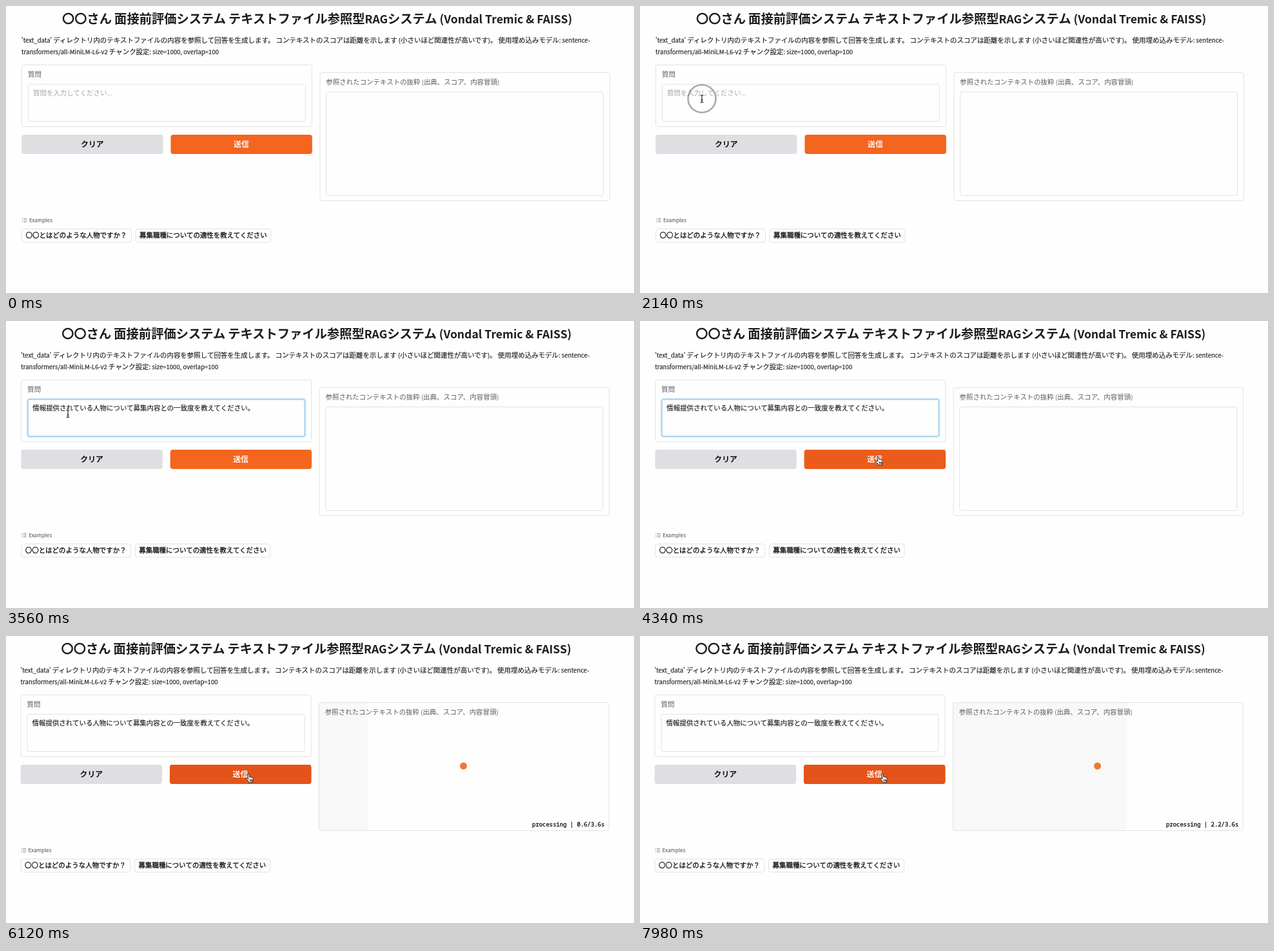
Write an HTML page that moves like this. It is 974 px wide and 446 px high and loops after 8 s.

```html
<!DOCTYPE html>
<html lang="ja">
<head>
<meta charset="utf-8">
<style>
  html, body { margin: 0; width: 100%; height: 100%; overflow: hidden; background: #fefefe; }
  svg { display: block; width: 974px; height: 446px; }
  text { font: 10.47px "Noto Sans CJK JP", "Noto Sans CJK", sans-serif; fill: #1c1c20; white-space: pre; }
  .latin { font-size: .91em; }
  .body { stroke: #1c1c20; stroke-width: .15; }
  .title { font-size: 19.3px; font-weight: 600; }
  .label { fill: #5c5c64; }
  .hint { fill: #a6a6ac; }
  .small { font-size: 8.9px; fill: #4a4a50; }
  .button { font-size: 11.9px; font-weight: 600; text-anchor: middle; fill: #111; }
  .chip { fill: #111; stroke: #111; stroke-width: .3; }
  #status { font: 8.92px "Noto Sans Mono", monospace; text-anchor: end; fill: #111; stroke: #111; stroke-width: .3; }
  .box { fill: none; stroke: #e2e2e6; }
  .cursor { stroke-linejoin: round; stroke-linecap: round; }
</style>
</head>
<body>
<svg viewBox="0 0 974 446">
  <g id="page">
    <text class="title" x="87" y="27">〇〇さん 面接前評価システム テキストファイル参照型RAGシステム (Vondal Tremic &amp; FAISS)</text>
    <text class="body" x="24" y="57.3">'text_data' ディレクトリ内のテキストファイルの内容を参照して回答を生成します。 コンテキストのスコアは距離を示します (小さいほど関連性が高いです)。 使用埋め込みモデル: sentence-</text>
    <text class="body" x="24" y="75">transformers/all-MiniLM-L6-v2 チャンク設定: size=1000, overlap=100</text>

    <rect class="box" x="24.5" y="91.5" width="450" height="96" rx="3"/>
    <text class="label" x="34" y="109.7">質問</text>
    <rect class="box" x="34.5" y="121.5" width="430" height="58" rx="3"/>
    <g id="focus" fill="none">
      <rect x="34.5" y="121.5" width="430" height="58" rx="3" stroke="#d8edfa" stroke-width="4"/>
      <rect x="34.5" y="121.5" width="430" height="58" rx="3" stroke="#8cc5ec"/>
    </g>
    <text id="hint" class="hint" x="42" y="139">質問を入力してください...</text>
    <text id="question" class="body" x="42" y="139">情報提供されている人物について募集内容との一致度を教えてください。</text>

    <rect x="24.2" y="200" width="219.4" height="30" rx="4" fill="#dfdfe3"/>
    <text class="button" x="133.9" y="219.3">クリア</text>
    <rect x="255.5" y="200" width="219.4" height="30" rx="4" fill="#f4651f"/>
    <rect id="hover" x="255.5" y="200" width="219.4" height="30" rx="4" fill="#e4531a"/>
    <text class="button" x="364.9" y="219.3" style="fill:#fff">送信</text>

    <rect id="bar" x="487" y="103.5" height="199" fill="#f8f8f8"/>
    <rect class="box" x="487" y="103.5" width="449.5" height="199" rx="3"/>
    <text class="label" x="496.3" y="121.7">参照されたコンテキストの抜粋 (出典、スコア、内容冒頭)</text>
    <rect id="output" class="box" x="496.5" y="133.5" width="430" height="161" rx="3"/>
    <g id="pending">
      <circle cx="711" cy="202" r="5.5" fill="#ee7a32"/>
      <text id="status" x="929.8" y="295.5"></text>
    </g>

    <path d="M25 330.5h1.2m1.3 0h5M25 333h1.2m1.3 0h5M25 335.5h1.2m1.3 0h5" stroke="#77777d" stroke-width=".8"/>
    <text class="small" x="36" y="336.2">Examples</text>
    <rect class="box" x="24.5" y="346.5" width="170" height="20.5" rx="4"/>
    <text class="chip" x="30.5" y="360.2">〇〇とはどのような人物ですか？</text>
    <rect class="box" x="201" y="346.5" width="210" height="20.5" rx="4"/>
    <text class="chip" x="207" y="360.2">募集職種についての適性を教えてください</text>
  </g>

  <g id="pointer" class="cursor">
    <g id="ring" fill="none">
      <circle r="21.5" stroke="#fff" stroke-width="5"/>
      <circle r="21.5" stroke="#111" stroke-width="2.6"/>
    </g>
    <g id="beam" fill="none">
      <path d="M-2-5.5Q0-5.5 0-4Q0-5.5 2-5.5M0-4V4.5M-2 6Q0 6 0 4.5Q0 6 2 6M-1.2 2H1.2" stroke="#fff" stroke-width="2.6"/>
      <path d="M-2-5.5Q0-5.5 0-4Q0-5.5 2-5.5M0-4V4.5M-2 6Q0 6 0 4.5Q0 6 2 6M-1.2 2H1.2" stroke="#111" stroke-width="1.1"/>
    </g>
    <path id="arrow" d="M0 0V11.5L2.7 9L4.6 13.2L6.5 12.3L4.7 8.3H8.3Z" fill="#111" stroke="#fff"/>
    <path id="hand" d="M-1.2.9C-1.2-.6 1-.6 1.1.9L1.6 4.2C2.2 3.4 3.4 3.6 3.7 4.6C4.3 3.9 5.4 4.2 5.6 5.2C6.2 4.8 7.1 5.2 7.2 6.2C7.4 8 7 9.6 6.2 11V12.8H.8C.4 11-1.8 9-2.8 7.4C-3.4 6.2-2 5.6-1 6.6L-.4 7.2ZM2.2 8V10.8M3.9 8V10.8M5.4 8V10.8" fill="#fff" stroke="#111" stroke-width=".9"/>
  </g>
</svg>
<script>
const LOOP = 8000, SUBMIT = 5390, ETA = 3.6;
const el = Object.fromEntries([...document.querySelectorAll('[id]')].map(node => [node.id, node]));
const clamp = v => Math.max(0, Math.min(1, v));
const ramp = (t, from, to) => clamp((t - from) / (to - from));
const ease = p => p * p * (3 - 2 * p);
const show = (node, on) => { node.style.opacity = Number(on); };

// Latin runs are set slightly smaller than the Japanese around them
for (const node of document.querySelectorAll('text[class]')) {
  node.innerHTML = node.innerHTML.replace(/[ -~]+/g, '<tspan class="latin">$&</tspan>');
}

// Pointer route: time, x, y
const route = [
  [480, -6, 452], [980, 97, 129], [1460, 97, 129], [1900, 96, 144],
  [3750, 96, 144], [4340, 369, 211], [4500, 376, 215]
];

function pointerAt(t) {
  let [, x, y] = route[0];
  for (let i = 1; i < route.length; i++) {
    const [t0, x0, y0] = route[i - 1], [t1, x1, y1] = route[i];
    if (t < t0) break;
    const p = ease(ramp(t, t0, t1));
    x = x0 + (x1 - x0) * p;
    y = y0 + (y1 - y0) * p;
  }
  return [x, y];
}

function cursorKind(x, y) {
  if (x > 34 && x < 465 && y > 121 && y < 180) return 'beam';
  const onButton = y > 200 && y < 230 && (x > 24 && x < 243 || x > 255 && x < 475);
  return onButton ? 'hand' : 'arrow';
}

const click = (t, from, to) => Math.min(ramp(t, from, from + 60), 1 - ramp(t, to - 60, to));

function draw(t) {
  const shift = t < 3500 ? 0 : t < 4440 ? -0.8 : -1.5;
  el.page.setAttribute('transform', `translate(${shift})`);

  const [x, y] = pointerAt(t);
  el.pointer.setAttribute('transform', `translate(${x} ${y})`);
  show(el.pointer, t >= 480);
  const kind = cursorKind(x, y);
  for (const name of ['beam', 'arrow', 'hand']) show(el[name], name === kind);
  show(el.ring, Math.max(click(t, 2120, 2330), click(t, 5130, 5350)));

  show(el.focus, ramp(t, 2150, 2300) * (1 - ramp(t, 5130, 5230)));
  const filled = t >= 3160;
  show(el.hint, !filled);
  show(el.question, filled);
  show(el.hover, ramp(t, 4240, 4440));

  const pending = t >= SUBMIT;
  const elapsed = Math.max(0, (t - SUBMIT) / 1200);
  show(el.output, !pending);
  show(el.pending, pending);
  el.bar.setAttribute('width', 449 * clamp(elapsed / ETA));
  el.status.textContent = `processing | ${elapsed.toFixed(1)}/${ETA}s`;
}

const start = performance.now();
function tick() {
  draw((performance.now() - start) % LOOP);
  requestAnimationFrame(tick);
}
tick();
</script>
</body>
</html>
```
